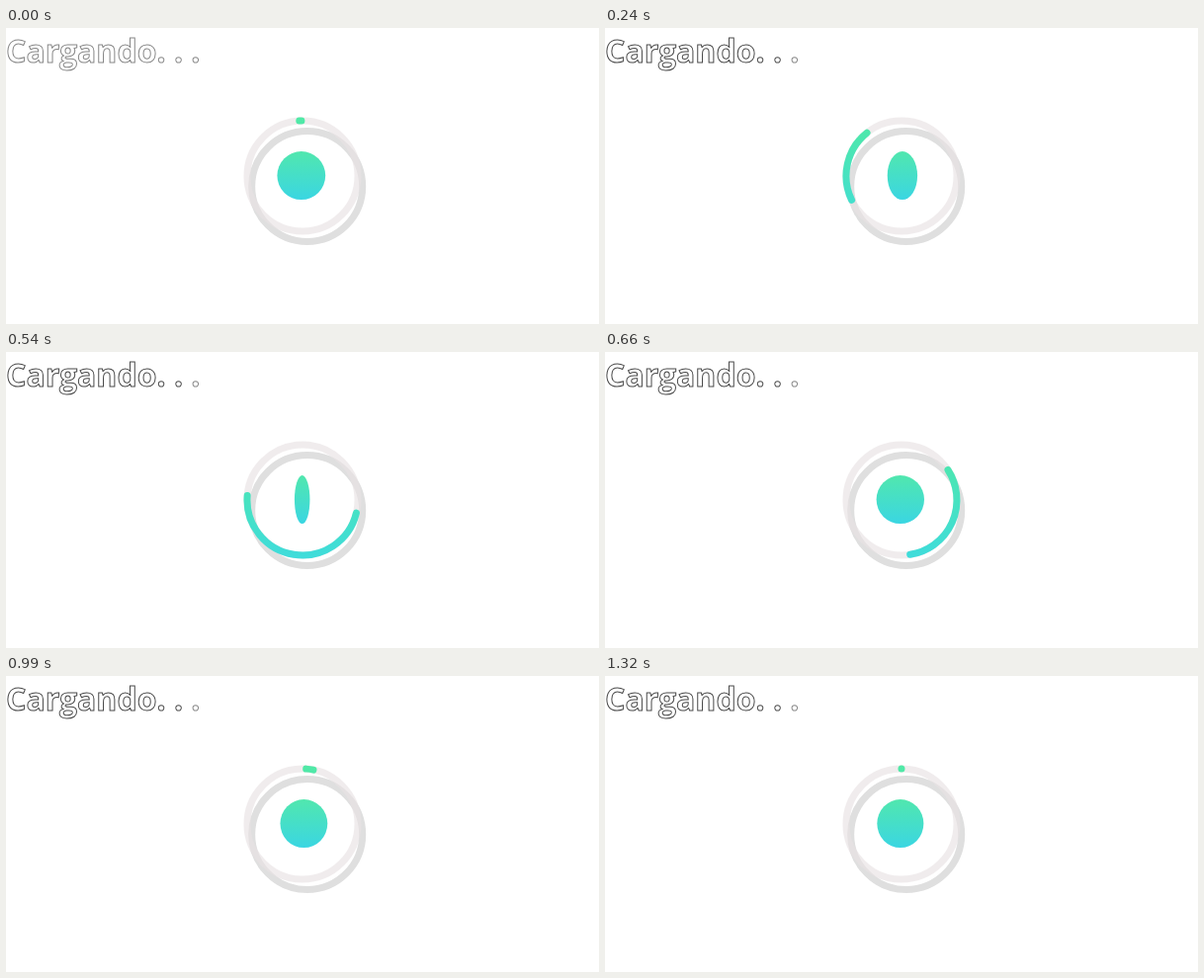
Animation of 600x300 px, one loop 1.35 s. Source, as an HTML page:

```html
<!DOCTYPE html>
<html lang="es">
<head>
<meta charset="utf-8">
<title>Cargando</title>
<style>
  html, body { margin: 0; width: 100%; height: 100%; overflow: hidden; background: #fff; }
  svg { display: block; }
  text {
    font: bold 32px "Open Sans", sans-serif;
    fill: #fff; stroke-width: 1px;
  }
  .pale { stroke: #868686; }
</style>
</head>
<body>
<svg width="600" height="300" viewBox="0 0 600 300">
  <defs>
    <linearGradient id="arcFill" gradientUnits="userSpaceOnUse" x1="0" y1="91" x2="0" y2="209">
      <stop offset="0" stop-color="#50e9a6"/>
      <stop offset="1" stop-color="#3fdcdb"/>
    </linearGradient>
    <linearGradient id="coinFill" gradientUnits="userSpaceOnUse" x1="0" y1="125" x2="0" y2="174">
      <stop offset="0" stop-color="#51e7ae"/>
      <stop offset="1" stop-color="#3ad6e2"/>
    </linearGradient>
  </defs>
  <text id="label" x="0" y="34.7">Cargando. . <tspan class="pale">.</tspan></text>
  <g fill="none" stroke-width="7">
    <circle cx="304.7" cy="160.5" r="56" stroke="#dfdfdf"/>
    <circle cx="300" cy="150" r="56" stroke="#e9e2e3" stroke-opacity=".65"/>
    <path id="arc" stroke="url(#arcFill)" stroke-linecap="round"/>
  </g>
  <ellipse id="coin" cy="149.6" ry="24.5" fill="url(#coinFill)"/>
</svg>
<script>
  const LOOP = 1350, GROW_END = 570, GROW_START = -6, SHRINK = 645, DARKEN = 30;
  const label = document.getElementById("label");
  const arc = document.getElementById("arc");
  const coin = document.getElementById("coin");

  // Point on the ring, angle in degrees anticlockwise from the top.
  function ringPoint(deg) {
    const a = deg * Math.PI / 180;
    return (300 - 56 * Math.sin(a)).toFixed(3) + " " + (150 - 56 * Math.cos(a)).toFixed(3);
  }

  // The arc grows to half a ring at a steady pace, then its tail catches up.
  function arcEnds(t) {
    if (t > LOOP + GROW_START) t -= LOOP;
    if (t < GROW_END) {
      const p = (t - GROW_START) / (GROW_END - GROW_START);
      return [90 * p, 270 * p];
    }
    const rest = Math.max(0, 1 - (t - GROW_END) / SHRINK) ** 3;
    return [360 - 270 * rest, 360 - 90 * rest];
  }

  function draw(t) {
    const [tail, head] = arcEnds(t);
    const end = Math.max(head, tail + 0.05);
    arc.setAttribute("d", `M${ringPoint(tail)}A56 56 0 0 0 ${ringPoint(end)}`);

    // Two full flips per loop around a slightly off-centre axis.
    const c = -Math.cos(t / LOOP * 4 * Math.PI);
    coin.setAttribute("cx", 300.1 + 1.3 * c);
    coin.setAttribute("rx", 24.4 * Math.abs(c));

    label.setAttribute("stroke", t < DARKEN ? "#868686" : "#484848");
  }

  const start = performance.now();
  function tick() {
    draw((performance.now() - start) % LOOP);
    requestAnimationFrame(tick);
  }
  draw(0);
  requestAnimationFrame(tick);
</script>
</body>
</html>
```
